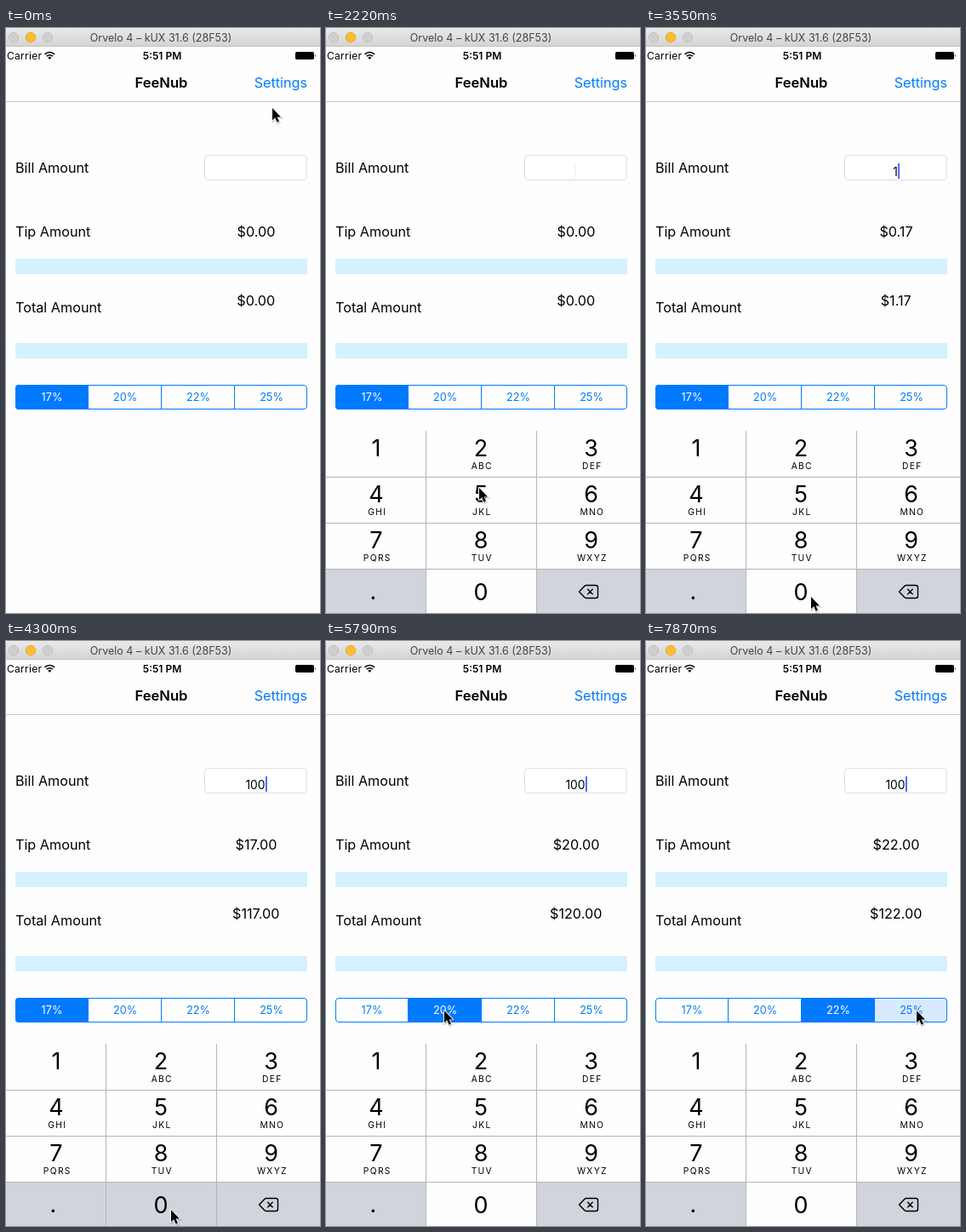
Write an HTML page that moves like this. It is 369 px wide and 687 px high and loops after 8 s.

```html
<!DOCTYPE html>
<html lang="en">
<head>
<meta charset="utf-8">
<title>Tip calculator</title>
<style>
  html, body { margin: 0; width: 100%; height: 100%; overflow: hidden; background: #fefefe; }
  svg { display: block; width: 369px; height: 687px; font-family: Inter, "Open Sans", sans-serif; }
  .body { font-size: 16.2px; }
  .mid { text-anchor: middle; }
  .blue { fill: #007aff; }
  .digit { font-size: 27px; text-anchor: middle; }
  .letters { font-size: 10.3px; letter-spacing: 1.3px; text-anchor: middle; }
  .seg { font-size: 12.7px; text-anchor: middle; }
</style>
</head>
<body>
<svg id="stage" viewBox="0 0 369 687">
  <defs>
    <linearGradient id="bar" x2="0" y2="1">
      <stop offset="0" stop-color="#ebeaeb"/>
      <stop offset="1" stop-color="#d4d3d4"/>
    </linearGradient>
    <clipPath id="segClip"><rect x="11" y="419" width="343" height="29" rx="4"/></clipPath>
  </defs>
  <rect width="369" height="687" fill="#fefefe"/>

  <!-- window bar -->
  <rect width="369" height="22" fill="url(#bar)"/>
  <path d="M0 21.5H369" stroke="#c3c2c3"/>
  <g stroke-width=".8">
    <circle cx="9" cy="11" r="5.7" fill="#d0cfd0" stroke="#bcbbbc"/>
    <circle cx="29" cy="11" r="5.7" fill="#fdbc2f" stroke="#dfa023"/>
    <circle cx="49" cy="11" r="5.7" fill="#d0cfd0" stroke="#bcbbbc"/>
  </g>
  <text class="mid" x="182" y="16" font-size="12.5" fill="#444">Orvelo 4 – kUX 31.6 (28F53)</text>

  <!-- status bar -->
  <text x="1" y="36.5" font-size="12" letter-spacing=".3">Carrier</text>
  <g fill="none" stroke="#000" stroke-width="1.7">
    <path d="M45.6 30.9a8 8 0 0 1 11.4 0M47.8 33.2a5 5 0 0 1 7 0"/>
  </g>
  <path d="M51.3 37l-2-2.2a2.9 2.9 0 0 1 4 0z"/>
  <text class="mid" x="183.5" y="36.5" font-size="12" font-weight="600">5:51 PM</text>
  <rect x="340" y="28" width="22" height="9" rx="1.8"/>
  <path d="M363 30.7q1.6 1.8 0 3.6z"/>

  <!-- navigation -->
  <text class="mid" x="182.5" y="70" font-size="16.6" font-weight="600">FeeNub</text>
  <text class="body blue" x="354" y="70" text-anchor="end">Settings</text>
  <path d="M0 86.5H369" stroke="#c9c9cb"/>

  <!-- form -->
  <g class="body">
    <text x="11" y="169.5">Bill Amount</text>
    <text x="11" y="244.5">Tip Amount</text>
    <text x="11" y="333.5">Total Amount</text>
    <text class="mid" id="tip" x="294" y="244.5"></text>
    <text class="mid" id="total" x="293.7" y="325.5"></text>
  </g>
  <rect x="233.5" y="149.5" width="120" height="29" rx="4" fill="#fff" stroke="#dfdfdf"/>
  <text class="mid" id="bill" x="293" y="174" font-size="13.8"></text>
  <rect id="caret" y="159" width="2" height="18" fill="#456cf0"/>
  <path d="M11 271h343v18H11zM11 370h343v18H11z" fill="#d5f0fe"/>

  <g id="segments" clip-path="url(#segClip)"></g>
  <path d="M96.5 420v28M182.5 420v28M268.5 420v28" stroke="#007aff"/>
  <rect x="11.5" y="419.5" width="342" height="28" rx="3.5" fill="none" stroke="#007aff"/>
  <g id="rates"></g>

  <g id="pad">
    <rect y="473" width="369" height="216" fill="#fefefe"/>
    <path d="M0 636h117v53H0zM248 636h121v53H248z" fill="#d1d4db"/>
    <rect id="press" fill="#d1d4db"/>
    <path d="M117.5 473V689M247.5 473V689M0 527.5H369M0 581.5H369M0 635.5H369" stroke="#b4b5b8"/>
    <g id="keys"></g>
    <text class="digit" x="55.5" y="671">.</text>
    <path d="M297.5 662l6.2-6.6q.9-.9 2-.9H317q2.5 0 2.5 2.5v10q0 2.5-2.5 2.5h-11.3q-1.100 0-2-.9zM307.200 658.800l6.400 6.400M313.600 658.800l-6.400 6.400"
      fill="none" stroke="#000" stroke-width="1.4" stroke-linejoin="round"/>
  </g>

  <g id="pointer">
    <path d="M0 0V14.200L3.200 11.300 5.600 16.800 8 15.800 5.600 10.400H10z" transform="translate(.6 1.200)"
      fill="#000" opacity=".22" stroke="#000" stroke-width="2"/>
    <path d="M0 0V14.200L3.200 11.300 5.600 16.800 8 15.800 5.600 10.400H10z"
      fill="#000" stroke="#fff" stroke-width="1.8" stroke-linejoin="round" paint-order="stroke"/>
  </g>
</svg>
<script>
const LOOP = 8000, TICKS = 54, TICK = LOOP / TICKS;
const RATES = [17, 20, 22, 25];
const $ = id => document.getElementById(id);

function add(parent, tag, attrs, text = '') {
  const el = document.createElementNS('http://www.w3.org/2000/svg', tag);
  for (const name in attrs) el.setAttribute(name, attrs[name]);
  el.textContent = text;
  parent.append(el);
  return el;
}

function set(id, attrs) {
  for (const name in attrs) $(id).setAttribute(name, attrs[name]);
}

// keypad
const COLS = [59, 182, 311.5];
['', 'ABC', 'DEF', 'GHI', 'JKL', 'MNO', 'PQRS', 'TUV', 'WXYZ'].forEach((letters, i) => {
  const x = COLS[i % 3], y = 503 + 54 * Math.floor(i / 3);
  add($('keys'), 'text', { class: 'digit', x, y }, i + 1);
  add($('keys'), 'text', { class: 'letters', x: x + 1.3, y: y + 15 }, letters);
});
add($('keys'), 'text', { class: 'digit', x: COLS[1], y: 672 }, '0');

const segs = RATES.map((rate, i) => ({
  box: add($('segments'), 'rect', { x: 11 + 86 * i - (i ? 1 : 0), y: 419, width: 86, height: 29 }),
  label: add($('rates'), 'text', { class: 'seg', x: 54 + 86 * i, y: 438 }, rate + '%')
}));

const KEY_BOX = {
  1: { x: 0, y: 473, width: 117, height: 54 },
  0: { x: 118, y: 636, width: 129, height: 53 }
};

// tick, changes to the app state
const EVENTS = [
  [0, { bill: '', rate: 0, lit: -1, key: null, blink: 10 }],
  [20, { bill: '1', key: 1, blink: 20 }],
  [21, { key: null }],
  [25, { bill: '10', key: 0, blink: 25 }],
  [26, { key: null }],
  [29, { bill: '100', key: 0, blink: 29 }],
  [30, { key: null }],
  [37, { lit: 1 }],
  [38, { lit: -1, rate: 1 }],
  [45, { lit: 2 }],
  [46, { lit: -1, rate: 2 }],
  [53, { lit: 3 }]
];

// tick, x, y of the pointer tip
const PATH = [
  [0, 313, 94], [3, 290, 111], [4, 290, 111], [9, 288, 161], [12, 288, 161],
  [15, 180, 540], [18, 58, 497], [21, 58, 497], [24, 194, 668], [30, 194, 668],
  [36, 139, 434], [39, 139, 434], [43, 222, 434], [46, 222, 434], [51, 318, 434], [54, 318, 434]
];

function pointerAt(k) {
  const i = PATH.findIndex(p => p[0] > k);
  const [k0, x0, y0] = PATH[i - 1], [k1, x1, y1] = PATH[i];
  const p = (k - k0) / (k1 - k0), e = p * p * (3 - 2 * p);
  return [Math.round(x0 + (x1 - x0) * e), Math.round(y0 + (y1 - y0) * e)];
}

// critically damped slide
function padOffset(ms) {
  const w = Math.max(0, ms - 1448) * 0.015;
  return Math.round(214 * (1 + w) * Math.exp(-w));
}

// one second: on, fade out, off, fade in
function caretAlpha(ms) {
  if (ms < 0) return 0;
  const p = ms % 1000;
  if (p < 605) return 1;
  if (p < 750) return (750 - p) / 145;
  return Math.max(0, (p - 850) / 150);
}

function draw(k) {
  const ms = k * TICK;
  const s = Object.assign({}, ...EVENTS.filter(e => e[0] <= k).map(e => e[1]));
  const tip = s.bill * RATES[s.rate] / 100;

  $('bill').textContent = s.bill;
  $('tip').textContent = '$' + tip.toFixed(2);
  $('total').textContent = '$' + (+s.bill + tip).toFixed(2);
  set('caret', { x: 291.7 + 4.4 * s.bill.length, opacity: caretAlpha(ms - s.blink * TICK) });

  segs.forEach(({ box, label }, i) => {
    const on = i === s.rate;
    box.setAttribute('fill', on ? '#007aff' : i === s.lit ? '#d9eafe' : '#fefefe');
    label.setAttribute('fill', on ? '#fff' : '#007aff');
  });

  set('press', s.key === null ? { width: 0 } : KEY_BOX[s.key]);
  set('pad', { transform: `translate(0 ${padOffset(ms)})` });
  set('pointer', { transform: `translate(${pointerAt(k)})` });
}

let last = -1;
function frame() {
  const k = Math.min(TICKS - 1, Math.floor((performance.now() % LOOP + 8) / TICK));
  if (k !== last) draw(last = k);
  requestAnimationFrame(frame);
}
frame();
</script>
</body>
</html>
```
